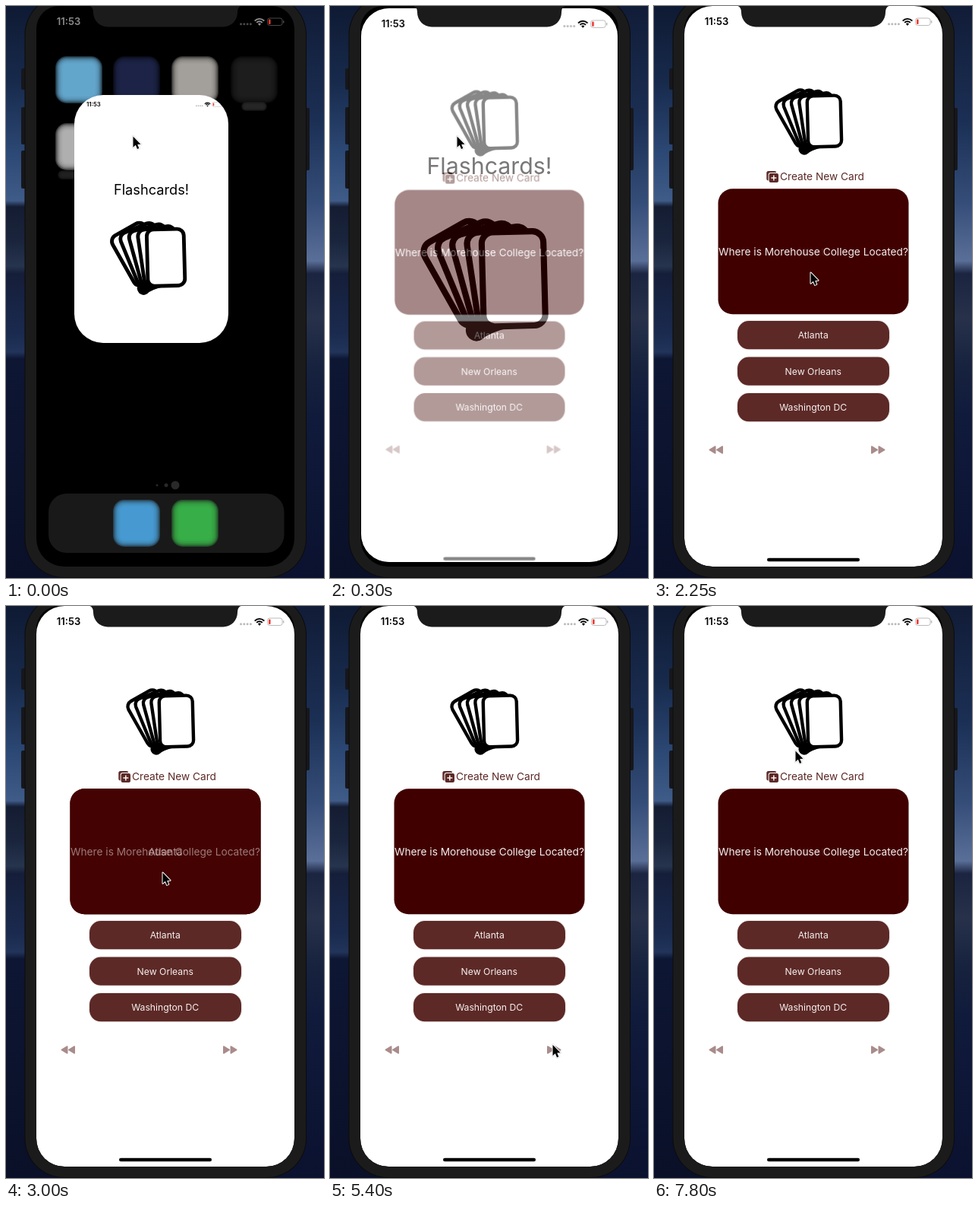
Write an HTML page with a canvas that moves like this. It is 419x752 px and loops after 8000 ms.

```html
<!DOCTYPE html>
<html lang="en">
<head>
<meta charset="utf-8">
<title>Flashcards</title>
<style>
  html, body { margin: 0; width: 100%; height: 100%; overflow: hidden; background: #0b1230; }
  canvas { display: block; width: 419px; height: 752px; }
</style>
</head>
<body>
<canvas id="stage" width="419" height="752"></canvas>
<script>
const W = 419, H = 752, LOOP = 8000, TICK = 150;
const SCREEN = { x: 40, y: 0, w: 340, h: 737 };
const BODY = '#1b1b1b', MAROON = '#400000', BROWN = '#5c2926';
const context = canvas => canvas.getContext('2d', { willReadFrequently: true });
const stage = context(document.getElementById('stage'));

// Opening window at each tick: scale, left, top, height, corner radius, app opacity.
const opening = [
  [0.597, 90, 117, 326, 38, 0],
  [0.9, 56, 28, 622, 38, 0.12],
  [0.994, 41, 3, 728, 37, 0.47],
  [0.999, 40, 0.5, 736, 37, 0.86],
  [1, 40, 0, 737, 37, 1]
];

// Pointer tip at given times; it holds still between separate moves.
const pointer = [
  [0, 167.5, 171.5], [1050, 167.5, 171.5], [1350, 199, 266],
  [1500, 199, 266], [1800, 215, 395], [1950, 214, 419], [2250, 206.5, 350.5],
  [3000, 206.5, 350.5], [3600, 196.5, 336],
  [4500, 196.5, 336], [4950, 275, 560], [5100, 291, 611], [5400, 293.5, 577],
  [6300, 293.5, 577], [6600, 239, 449],
  [6900, 239, 449], [7200, 249, 528],
  [7350, 249, 528], [7800, 186.5, 190.5]
];

// How far the card has turned to its answer.
const answer = [[0, 0], [2400, 0], [2700, 1], [2850, 1], [3150, 0]];

function sample(track, t) {
  const i = track.findIndex(key => key[0] > t);
  if (i < 0) return track[track.length - 1].slice(1);
  const a = track[i - 1], b = track[i], k = (t - a[0]) / (b[0] - a[0]);
  return a.slice(1).map((v, n) => v + (b[n + 1] - v) * k);
}

function layer(draw) {
  const canvas = document.createElement('canvas');
  canvas.width = W;
  canvas.height = H;
  draw(context(canvas));
  return canvas;
}

function box(c, x, y, w, h, r, fill) {
  c.beginPath();
  c.roundRect(x, y, w, h, r);
  if (fill) { c.fillStyle = fill; c.fill(); }
}

// A box with a blurred edge, built from nested translucent boxes.
function softBox(c, x, y, w, h, r, fill, spread) {
  c.save();
  c.globalAlpha = 0.3;
  for (let d = spread; d >= -spread; d -= spread / 4) {
    box(c, x - d, y - d, w + 2 * d, h + 2 * d, Math.max(r + d, 1), fill);
  }
  c.restore();
}

function label(c, text, x, y, size, color, align = 'center', weight = 400) {
  c.font = `${weight} ${size}px Inter, "Open Sans", sans-serif`;
  c.textAlign = align;
  c.fillStyle = color;
  c.fillText(text, x, y);
}

function disc(c, x, y, r, color) {
  c.beginPath();
  c.arc(x, y, r, 0, Math.PI * 2);
  c.fillStyle = color;
  c.fill();
}

function strip(c, x, w, stops) {
  const g = c.createLinearGradient(0, 0, 0, H);
  stops.forEach(([at, color]) => g.addColorStop(at / H, color));
  c.fillStyle = g;
  c.fillRect(x, 0, w, H);
}

function drawWallpaper(c) {
  strip(c, 0, 210, [[0, '#0f1a33'], [100, '#172a4c'], [190, '#2b4773'], [256, '#3f5b88'],
    [264, '#141c32'], [310, '#1a253d'], [342, '#27344d'], [352, '#151e39'],
    [430, '#1a2a4f'], [455, '#22345a'], [464, '#0d1633'], [752, '#0a1028']]);
  strip(c, 210, 209, [[0, '#111c37'], [150, '#1b2f54'], [260, '#354e79'], [335, '#5a6f98'],
    [352, '#1b2440'], [410, '#27314a'], [470, '#18233f'], [540, '#101a3b'], [752, '#0b1230']]);
}

function drawBody(c) {
  [[82, 28], [133, 49], [190, 50]].forEach(([y, h]) => box(c, 20, y, 8, h, 2, '#16171c'));
  box(c, 392, 134, 8, 82, 2, '#16171c');
  box(c, 24.5, -14, 371.5, 766, 52, '#0c0c0c');
  box(c, 25.5, -13, 369.5, 764, 51, BODY);
}

function drawNotch(c) {
  c.beginPath();
  c.moveTo(107, -1);
  c.quadraticCurveTo(115, 0, 115, 8);
  c.arcTo(115, 27.5, 135, 27.5, 19);
  c.arcTo(305, 27.5, 305, 8, 19);
  c.lineTo(305, 8);
  c.quadraticCurveTo(305, 0, 313, -1);
  c.closePath();
  c.fillStyle = BODY;
  c.fill();
}

function drawStatus(c, ink, faint) {
  label(c, '11:53', 82.5, 25, 13, ink, 'center', 600);
  for (let i = 0; i < 4; i++) disc(c, 309.5 + i * 4.3, 23.7, 1.5, faint);
  c.strokeStyle = ink;
  c.lineWidth = 1.9;
  [5.2, 8.6].forEach(r => {
    c.beginPath();
    c.arc(334, 25.5, r, -Math.PI * 0.76, -Math.PI * 0.24);
    c.stroke();
  });
  c.beginPath();
  c.moveTo(334, 26);
  c.arc(334, 25.5, 2.8, -Math.PI * 0.76, -Math.PI * 0.24);
  c.fillStyle = ink;
  c.fill();
  box(c, 344.5, 16, 19.5, 9.5, 2.8);
  c.strokeStyle = faint;
  c.lineWidth = 1;
  c.stroke();
  box(c, 365, 19, 1.4, 3.6, 0.7, faint);
  box(c, 346, 17.5, 2.6, 6.5, 1, '#f0392f');
}

function clipScreen(c) {
  box(c, SCREEN.x, SCREEN.y, SCREEN.w, SCREEN.h, [30, 30, 37, 37]);
  c.clip();
}

function drawHome(c) {
  c.save();
  clipScreen(c);
  c.fillStyle = '#000';
  c.fillRect(SCREEN.x, SCREEN.y, SCREEN.w, SCREEN.h);
  drawStatus(c, '#8c8c8c', '#484848');
  box(c, 56, 641, 310.5, 78, 24, '#191919');
  [[96, 97, '#67acd5'], [172, 97, '#20264a'], [249, 97, '#aaa69e'], [327, 97, '#202020'],
   [96, 185, '#b5b5b5'], [172, 680, '#4a9fd8'], [249, 680, '#38b449']]
    .forEach(([x, y, color]) => softBox(c, x - 26, y - 26, 52, 52, 10, color, 5));
  softBox(c, 312, 128, 30, 8, 4, '#2a2a2a', 2);
  softBox(c, 70, 218, 26, 8, 4, '#242424', 2);
  [[199, 1.5], [211, 2.5], [223, 5.5]].forEach(([x, r]) => disc(c, x, 630, r, '#292929'));
  c.restore();
}

// A fan of five cards, the last one in front.
function drawFan(c) {
  disc(c, 198, 188, 7.6, '#000');
  c.beginPath();
  c.moveTo(200, 195.5);
  c.quadraticCurveTo(208, 189, 222, 186);
  c.lineTo(200, 180);
  c.fillStyle = '#000';
  c.fill();
  for (let i = 0; i < 5; i++) {
    c.save();
    c.translate(190.5 + i * 3.2, 187.5 - i * 0.5);
    c.rotate((-29.5 + i * 7) * Math.PI / 180);
    box(c, 0, -67, 44, 67, 8, '#fff');
    c.strokeStyle = '#000';
    c.lineWidth = 4.4;
    c.stroke();
    c.restore();
  }
  disc(c, 198, 190, 5.6, '#000');
}

function drawSplash(c) {
  c.fillStyle = '#fff';
  c.fillRect(SCREEN.x, SCREEN.y, SCREEN.w, SCREEN.h);
  drawStatus(c, '#000', '#bbb');
  label(c, 'Flashcards!', 210, 219, 30.5, '#000');
  c.save();
  c.translate(124, 292);
  c.scale(1.86, 1.86);
  c.translate(-161, -116);
  drawFan(c);
  c.restore();
}

function drawSkip(c, x, dir) {
  c.fillStyle = c.strokeStyle = '#a98c8b';
  c.lineWidth = 2;
  c.lineJoin = 'round';
  [-9, 0.5].forEach(dx => {
    const back = x + dir * (dx + 1), tip = x + dir * (dx + 8);
    c.beginPath();
    c.moveTo(back, 579.3);
    c.lineTo(tip, 583.5);
    c.lineTo(back, 587.7);
    c.closePath();
    c.fill();
    c.stroke();
  });
}

function drawCreate(c) {
  box(c, 148.3, 217, 13, 12.6, 2.5, BROWN);
  box(c, 150.6, 219, 14.5, 14, 3, '#fff');
  box(c, 151.6, 220, 12.4, 12, 2.2, BROWN);
  c.fillStyle = '#fff';
  c.fillRect(154.3, 225.3, 7, 1.4);
  c.fillRect(157.1, 222.5, 1.4, 7);
  label(c, 'Create New Card', 166, 229.3, 13.7, BROWN, 'left');
}

function drawCard(c, turned) {
  box(c, 84.5, 240.3, 251, 165, 19, MAROON);
  c.save();
  c.globalAlpha = turned;
  box(c, 84.5, 240.3, 251, 165, 19, '#480605');
  c.globalAlpha = 0.08 + 0.92 * turned;
  label(c, 'Atlanta', 210, 328, 13.7, '#fff');
  c.globalAlpha = 1 - turned;
  label(c, 'Where is Morehouse College Located?', 210, 328, 13.7, '#f6eeee');
  c.restore();
}

function drawApp(c) {
  c.fillStyle = '#fff';
  c.fillRect(SCREEN.x, SCREEN.y, SCREEN.w, SCREEN.h);
  drawStatus(c, '#000', '#bbb');
  drawFan(c);
  drawCreate(c);
  drawCard(c, 0);
  ['Atlanta', 'New Orleans', 'Washington DC'].forEach((text, i) => {
    const y = 414 + i * 47.5;
    box(c, 109, y - 1, 202, 39.3, 16, '#efe9e9');
    box(c, 110, y, 200, 37.3, 15, BROWN);
    label(c, text, 209.7, y + 23.2, 12.2, '#f6f0f0');
  });
  drawSkip(c, 82, -1);
  drawSkip(c, 295, 1);
  box(c, 149, 725.8, 122, 4.4, 2.2, '#000');
}

const backdrop = layer(c => { drawWallpaper(c); drawBody(c); drawHome(c); });
const appLayer = layer(drawApp);

function drawWindow(c, t) {
  const [scale, x, y, h, r, fade] = opening[Math.min(t / TICK, opening.length - 1)];
  const [turned] = sample(answer, t);
  c.save();
  clipScreen(c);
  box(c, x, y, SCREEN.w * scale, h, r);
  c.clip();
  c.translate(x, y);
  c.scale(scale, scale);
  c.translate(-SCREEN.x, 0);
  if (fade < 1) drawSplash(c);
  c.globalAlpha = fade;
  c.drawImage(appLayer, 0, 0);
  if (turned > 0) drawCard(c, turned);
  c.restore();
}

function drawPointer(c, t) {
  c.save();
  c.translate(...sample(pointer, t));
  c.beginPath();
  [[0, 0], [0, 14.3], [3.3, 11.3], [5.5, 16.4], [7.8, 15.4], [5.7, 10.4], [10, 10.2]]
    .forEach(([x, y]) => c.lineTo(x, y));
  c.closePath();
  c.lineJoin = 'round';
  c.lineWidth = 3.4;
  c.strokeStyle = 'rgba(0,0,0,0.12)';
  c.stroke();
  c.lineWidth = 2;
  c.strokeStyle = '#fff';
  c.stroke();
  c.fillStyle = '#000';
  c.fill();
  c.restore();
}

let shown = -1, start;

function render(now) {
  const t = Math.floor(now % LOOP / TICK) * TICK;
  if (t === shown) return;
  shown = t;
  stage.drawImage(backdrop, 0, 0);
  drawWindow(stage, t);
  drawNotch(stage);
  drawPointer(stage, t);
}

function tick(now) {
  start ??= now;
  render(now - start);
  requestAnimationFrame(tick);
}
render(0);
requestAnimationFrame(tick);
</script>
</body>
</html>
```
